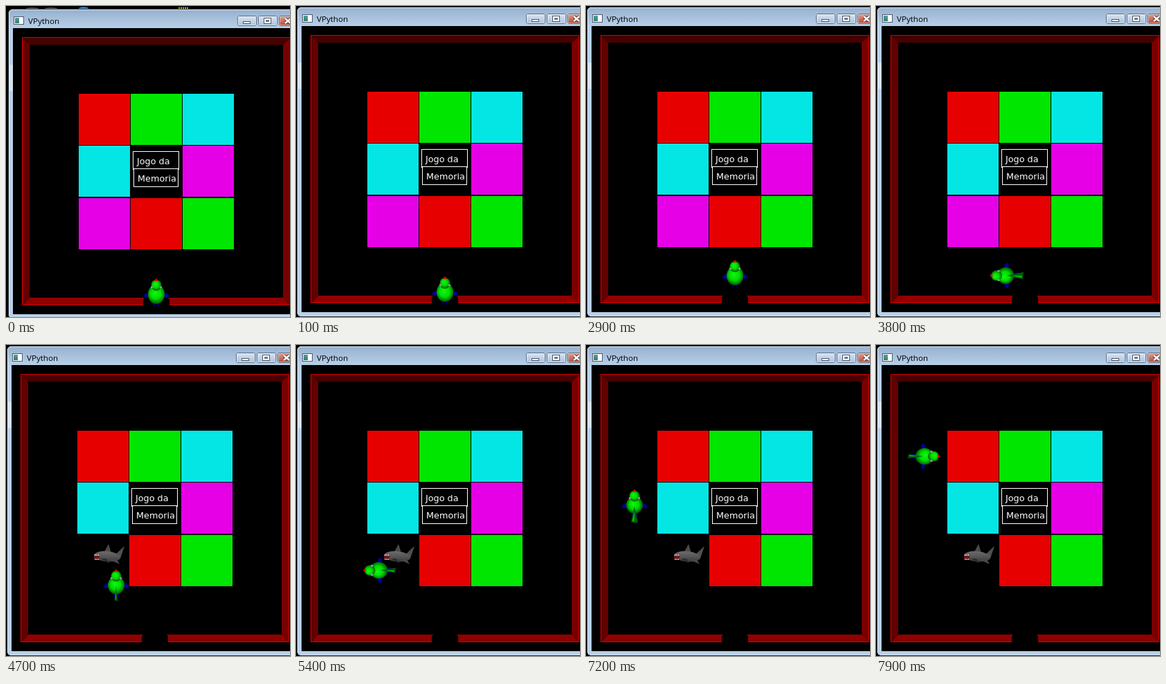
Write an HTML page with a canvas that moves like this. It is 410x450 px and loops after 8 s.

```html
<!DOCTYPE html>
<html lang="pt">
<head>
<meta charset="utf-8">
<title>VPython</title>
<style>
html, body { margin: 0; width: 100%; height: 100%; overflow: hidden; background: #000; }
canvas { display: block; }
</style>
</head>
<body>
<canvas id="stage" width="410" height="450"></canvas>
<script>
const c = document.getElementById('stage').getContext('2d');
const LOOP = 8000, STEP = 100, REVEAL = 4700;
const CENTER = { x: 215, y: 236 };
const COLORS = { R: '#e60000', G: '#00e600', C: '#04e6e4', M: '#e600e6' };
const TILES = 'RGCC MMRG';

// The bird turns toward each point, then walks there between go and end.
const START = { x: 215, y: 414 };
const ROUTE = [
  { turn: 2400, go: 2600, end: 2900, x: 215, y: 390 },
  { turn: 3400, go: 3500, end: 4100, x: 159, y: 390 },
  { turn: 4100, go: 4300, end: 4900, x: 159, y: 326 },
  { turn: 5000, go: 5000, end: 5900, x: 70, y: 326 },
  { turn: 6000, go: 6000, end: 6400, x: 70, y: 312 },
  { turn: 6400, go: 6400, end: 7900, x: 70, y: 161 },
  { turn: 7900, go: 7900, end: 8000, x: 80, y: 161 }
];

function box(x, y, w, h, fill) {
  c.fillStyle = fill;
  c.fillRect(x, y, w, h);
}

function frame(x, y, w, h, color) {
  c.strokeStyle = color;
  c.lineWidth = 1;
  c.strokeRect(x + 0.5, y + 0.5, w - 1, h - 1);
}

function poly(fill, ...points) {
  c.fillStyle = fill;
  c.beginPath();
  for (const [x, y] of points) c.lineTo(x, y);
  c.fill();
}

function oval(x, y, rx, ry, fill, tilt = 0) {
  c.fillStyle = fill;
  c.beginPath();
  c.ellipse(x, y, rx, ry, tilt, 0, 7);
  c.fill();
}

function pane(x, y, w, h, r, fill, edge) {
  c.beginPath();
  c.roundRect(x + 0.5, y + 0.5, w - 1, h - 1, r);
  c.fillStyle = fill;
  c.fill();
  c.strokeStyle = edge;
  c.lineWidth = 1;
  c.stroke();
}

function fade(y0, y1, ...colors) {
  const g = c.createLinearGradient(0, y0, 0, y1);
  colors.forEach((k, i) => g.addColorStop(i / (colors.length - 1), k));
  return g;
}

function text(s, x, y, font, color) {
  c.font = font;
  c.fillStyle = color;
  c.fillText(s, x, y);
}

function desktop() {
  box(0, 0, 410, 450, '#000');
  oval(38, 4, 10, 1.5, '#777');
  oval(65, 4, 10, 1.5, '#777');
  oval(112, 5, 8, 3.5, '#3d8fd0');
  for (let x = 249; x < 263; x += 3) box(x, 2, 2, 2, '#d8b83c');
}

function button(x, top, bottom) {
  pane(x, 11, 28, 15, 2.5, fade(11, 26, top, bottom), '#5b6f88');
  c.strokeStyle = 'rgba(255,255,255,.45)';
  c.strokeRect(x + 1.5, 12.5, 25, 12);
}

function glyph(x, y, w, h) {
  box(x, y, w, h, '#fff');
  frame(x, y, w, h, '#4c5868');
}

function cross(x, y, width, color) {
  c.strokeStyle = color;
  c.lineWidth = width;
  c.beginPath();
  for (const s of [-4, 4]) {
    c.moveTo(x - s, y - 3.5);
    c.lineTo(x + s, y + 3.5);
  }
  c.stroke();
}

function chrome() {
  pane(1, 1, 430, 449, 6, '#b9d1ea', '#1c242c');
  pane(2, 2, 428, 447, 5, fade(2, 30, '#96b0ce', '#b9d1ea'), '#dbe7f3');
  box(3, 30, 5, 418, fade(30, 448, '#b9d1ea', '#b9d1ea'));
  box(2, 82, 6, 38, '#d8e3ef');

  glyph(9, 12, 15, 12);
  box(11, 14, 6, 8, fade(14, 22, '#4f9fb0', '#3b7a55'));

  text('VPython', 30, 23, '11.6px "Open Sans", "Noto Sans", sans-serif', '#000');

  button(332, '#dbe6f2', '#a8c0da');
  button(362, '#dbe6f2', '#a8c0da');
  button(392, '#e0a596', '#b8432a');
  glyph(340, 19, 11, 4);
  glyph(370, 14, 11, 9);
  box(373, 17, 5, 3, '#6a7a8e');
  cross(405, 18.5, 4.5, '#5a3a38');
  cross(405, 18.5, 2.4, '#fff');
  box(8, 29, 420, 414, '#000');
}

function arena() {
  const outer = [[22, 43], [409, 43], [409, 430], [22, 430]];
  const inner = outer.map(p => p.map(v => v + (v < 200 ? 10 : -11)));
  ['#480000', '#780000', '#900000', '#640000'].forEach((k, i) => {
    const j = (i + 1) % 4;
    poly(k, outer[i], outer[j], inner[j], inner[i]);
  });
  frame(21, 42, 388, 388, '#d80000');
  poly('#000', [198, 419], [232, 419], [234, 422], [234, 430], [196, 430], [196, 422]);
}

function label(s, x, y, w) {
  box(x, y, w, 27, '#000');
  frame(x, y, w, 27, '#fff');
  text(s, x + 6, y + 18.5, '12.8px "DejaVu Sans", Verdana, sans-serif', '#fff');
}

function board(open) {
  [...TILES].forEach((k, i) => {
    if (k === ' ' || (open && i === 6)) return;
    const row = Math.floor(i / 3);
    box(103 + i % 3 * 75, Math.round(124 + row * 75.4), 74, 74, COLORS[k]);
  });
  label('Jogo da', 181, 207, 67);
  label('Memoria', 182, 232, 65);
}

function shark() {
  const skin = fade(297, 316, '#707070', '#555', '#303030');
  poly('#4a4a4a', [141, 301], [148, 288], [152, 301]);
  poly('#505050', [157, 304], [171, 291], [165, 309]);
  oval(146, 306, 19, 7.5, skin, 0.1);
  poly('#484848', [150, 311], [159, 309], [164, 317]);
  poly('#2c2c2c', [137, 309], [145, 309], [149, 316]);
  oval(131, 307, 4, 4, '#701818');
  for (let x = 128; x < 135; x += 2.4) {
    box(x, 303, 1.3, 2, '#eee');
    box(x, 309.5, 1.3, 1.5, '#eee');
  }
}

function ball(x, y, rx, ry) {
  const g = c.createRadialGradient(x - 2, y - 2, 0, x, y, ry);
  g.addColorStop(0, '#10fa10');
  g.addColorStop(0.55, '#00dc00');
  g.addColorStop(1, '#005800');
  oval(x, y, rx, ry, g);
}

function bird({ x, y, turn }) {
  // The upright tail fin shows more the farther it is seen from the side.
  const side = Math.abs(Math.cos(turn) * (x - CENTER.x) + Math.sin(turn) * (y - CENTER.y));
  const fin = Math.min(5, side / 25), tip = 21 + fin;
  c.save();
  c.translate(x, y);
  c.rotate(turn);
  for (const s of [-1, 1]) {
    poly('#000098', [s * 10, -2], [s * 16, -1], [s * 19, 3], [s * 15, 5], [s * 10, 4]);
    poly('#000080', [s, 12], [s * 4, 12], [s * 3, 20]);
  }
  ball(0, 0, 12, 14 - fin / 3);
  poly('#005a10', [0, 2], [-fin, tip - 1], [fin, tip]);
  poly('#00b800', [0, 8], [-fin * 0.7, tip - 2], [0, tip - 3]);
  ball(0, -13, 7.5, 8);
  poly('#e00000', [-3, -19], [0, -23], [3, -19]);
  for (const s of [-1, 1]) oval(s * 6.5, -10, 1.8, 1.8, '#7f9a88');
  c.restore();
}

function pose(t) {
  let from = START, at = { ...START, turn: 0 };
  for (const to of ROUTE) {
    if (t < to.turn) break;
    const k = to.end > to.go ? Math.min(1, Math.max(0, (t - to.go) / (to.end - to.go))) : 1;
    at = {
      x: from.x + (to.x - from.x) * k,
      y: from.y + (to.y - from.y) * k,
      turn: Math.atan2(to.x - from.x, from.y - to.y)
    };
    from = to;
  }
  return at;
}

function draw(t) {
  desktop();
  c.save();
  if (t < STEP) c.translate(2, 3);
  chrome();
  arena();
  board(t >= REVEAL);
  if (t >= REVEAL) shark();
  bird(pose(Math.floor(t / STEP) * STEP));
  c.restore();
}

const begin = performance.now();
function tick() {
  draw((performance.now() - begin) % LOOP);
  requestAnimationFrame(tick);
}
tick();
</script>
</body>
</html>
```
